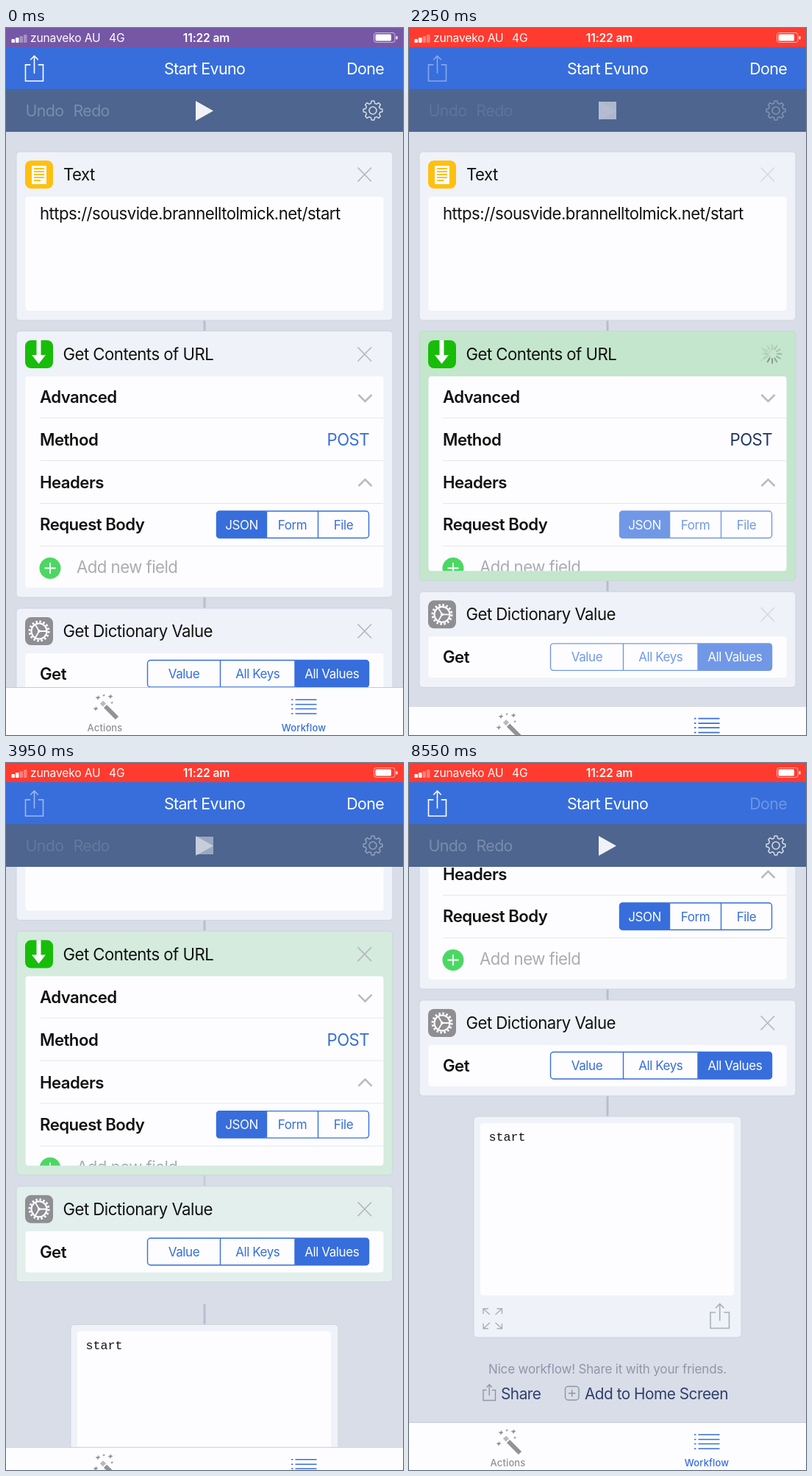
An HTML page that plays this animation: 540 px wide and 960 px high, repeating every 8600 ms.

```html
<!DOCTYPE html>
<html lang="en">
<head>
<meta charset="utf-8">
<title>Workflow run</title>
<style>
  html, body { margin: 0; width: 100%; height: 100%; overflow: hidden; background: #d8dde8; }
  svg { display: block; width: 100%; height: 100%; }
  text { font: 400 22.2px Inter, "Open Sans", sans-serif; letter-spacing: -.024em; fill: #111; white-space: pre; }
  .bold { font-weight: 600; }
  .light { font-size: 21.4px; letter-spacing: -.03em; fill: #fff; }
  .status { font-size: 15.6px; letter-spacing: -.01em; fill: #fff; }
  .segment { font-size: 17px; letter-spacing: -.025em; }
  .tab { font-size: 13px; font-weight: 500; letter-spacing: .01em; }
  .hint { font-size: 17px; letter-spacing: -.01em; fill: #8e96a8; }
  .link { font-size: 20.8px; fill: #2f3f6b; }
  .mono { font: 16.7px "Liberation Mono", monospace; letter-spacing: 0; }
  .mid { text-anchor: middle; }
  .end { text-anchor: end; }
  .line { fill: none; stroke-width: 1.6; }
</style>
</head>
<body>
<svg id="stage" viewBox="0 0 540 960" preserveAspectRatio="none"></svg>
<script>
const LOOP = 8600, STEP = 50, ROW = 57.5, SCROLL = 466;
const BLUE = '#376edc', GRAY = '#b5b8be', WHITE = '#fdfdff';

// Drawing helpers
const text = (x, y, s, cls = '', attrs = '') => `<text x="${x}" y="${y}" class="${cls}" ${attrs}>${s}</text>`;
const rect = (x, y, w, h, fill, r = 0, attrs = '') =>
  `<rect x="${x}" y="${y}" width="${w}" height="${h}" rx="${r}" fill="${fill}" ${attrs}/>`;
const line = (d, stroke, width = 1.6, attrs = '') =>
  `<path class="line" d="${d}" stroke="${stroke}" style="stroke-width:${width}" ${attrs}/>`;
const group = (id, body, attrs = '') => `<g id="${id}" ${attrs}>${body}</g>`;

const connector = (y1, y2, attrs = '') => rect(268.5, y1, 3, y2 - y1, '#b5bfcc', 0, attrs);
const separator = y => rect(46, y, 467, 1, '#e4e6eb');
const cross = y => line(`M478.500 ${y - 9.5}l18.500 19m0 -19l-18.500 19`, GRAY, 1.7, 'data-edit="1"');
const chevron = (y, up) => line(`M479.500 ${y}l9 ${up ? -9 : 9}l9 ${up ? 9 : -9}`, '#b9bbc1', 2.6);
const shareIcon = (x, y, w, h, stroke, width) => {
  const c = x + w / 2, a = w * .22, top = y + h * .35;
  return line(`M${c - a} ${top}H${x}V${y + h}H${x + w}V${top}H${c + a}M${c} ${y + h * .7}V${y}` +
    `M${c - a} ${y + a}L${c} ${y}L${c + a} ${y + a}`, stroke, width);
};

function card(id, y, h, inner, innerH) {
  const shape = (fill, name, attrs = '') => rect(14, y, 512, h, fill, 5, `id="${name}" ${attrs}`);
  return shape('#eff2f9', id + 'Base', 'stroke="#cfd5e0" stroke-width="1"') +
    shape('#a8dfb0', id + 'Glow', 'opacity="0"') +
    rect(26.5, inner, 487, innerH, WHITE, 4, `id="${id}Inner"`);
}

function segments(y, edges, labels, selected) {
  const last = edges.length - 1, h = 36.5;
  const fill = rect(edges[selected], y, edges[selected + 1] - edges[selected], h, BLUE, 3);
  const dividers = edges.slice(1, last).map(x => line(`M${x} ${y}v${h}`, BLUE, 1.4)).join('');
  const names = labels.map((s, i) => text((edges[i] + edges[i + 1]) / 2, y + 24.5, s, 'segment mid',
    `style="fill:${i === selected ? WHITE : BLUE}"`)).join('');
  return `<g data-control="1">${fill}${rect(edges[0], y, edges[last] - edges[0], h, 'none', 4,
    `stroke="${BLUE}" stroke-width="1.4"`)}${dividers}${names}</g>`;
}

function gearPath(cx, cy, teeth, inner, outer) {
  const points = [];
  for (let i = 0; i < teeth; i++)
    for (const [r, off] of [[inner, -.33], [outer, -.18], [outer, .18], [inner, .33]]) {
      const a = (i + off) / teeth * 2 * Math.PI;
      points.push(`${(cx + r * Math.sin(a)).toFixed(1)} ${(cy - r * Math.cos(a)).toFixed(1)}`);
    }
  return `M${points.join('L')}Z`;
}

const textCard = card('text', 168, 229, 229, 155) +
  rect(26, 180, 38, 38, '#fec010', 8) + rect(35, 187, 20, 25, WHITE) +
  line([191, 195, 199, 203, 207].map((y, i) => `M38 ${y}h${i === 4 ? 9 : 14}`).join(''), '#fec010', 1.8) +
  text(78, 207, 'Text') + cross(199) +
  text(46, 260, 'https://sousvide.brannelltolmick.net/start');

const urlCard = card('url', 411.5, 361.5, 473, 287) +
  rect(26, 424, 38, 38, '#17bd08', 8) +
  `<path d="M41.500 424h6v20h6.500l-9.500 12l-9.500 -12h6.500z" fill="${WHITE}"/>` +
  text(77.5, 451, 'Get Contents of URL') + cross(443) + group('spinner',
    Array.from({ length: 12 }, (_, i) =>
      `<path d="M494 435.500v-5.500" stroke="#444a48" stroke-width="2" stroke-linecap="round" transform="rotate(${i * 30} 494 442.500)"/>`).join('')) +
  group('rows', text(46, 509, 'Advanced', 'bold') + chevron(498, false) + separator(529) +
    text(46, 567, 'Method', 'bold') + text(494, 567, 'POST', 'end', 'id="post"') + separator(587) +
    text(46, 625, 'Headers', 'bold') + chevron(622, true) + separator(645) +
    text(46, 682, 'Request Body', 'bold') +
    segments(656, [286.5, 354.5, 424.5, 493.5], ['JSON', 'Form', 'File'], 0) + separator(703) +
    `<circle cx="60" cy="733.500" r="14.500" fill="#4cd763"/>` + line('M52.500 733.500h15m-7.500 -7.500v15', WHITE, 1.8) +
    text(96, 740, 'Add new field', '', 'style="fill:#aaacb2"'), 'clip-path="url(#rowsClip)"');

const dictCard = connector(773, 788, 'id="dictLink"') + card('dict', 788, 130, 849, 56) +
  rect(26, 800, 38, 38, '#8e8e93', 8) +
  `<g fill="none" stroke="${WHITE}"><circle cx="45" cy="819" r="10.500" stroke-width="2.200"/>
   <circle cx="45" cy="819" r="13" stroke-width="3" stroke-dasharray="2.550 2.555"/>
   <path d="M45 819H55M45 819L40 810.300M45 819L40 827.700" stroke-width="1.800"/></g>
   <circle cx="45" cy="819" r="2" fill="${WHITE}"/>` +
  text(77.5, 827, 'Get Dictionary Value') + cross(819) + text(46, 885, 'Get', 'bold') +
  segments(858.5, [192.5, 291.5, 393, 493.5], ['Value', 'All Keys', 'All Values'], 2);

const result = connector(918, 946) +
  rect(88, 946, 364, 300, '#eff2f9', 5, 'stroke="#cfd5e0"') + rect(97, 955, 345, 234, WHITE, 4) +
  text(108.5, 979, 'start', 'mono') +
  line('M101 1214v-7h7m-7 0l9 8M119.500 1207h7v7m0 -7l-9 8M101 1227v7h7m-7 0l9 -8M119.500 1234h7v-7m0 7l-9 -8', '#a9afba', 1.4) +
  shareIcon(410, 1200.5, 25.5, 33, '#a9afba', 1.6) +
  text(270, 1295, 'Nice workflow! Share it with your friends.', 'hint mid') +
  shareIcon(101, 1310, 16.5, 21.5, '#8e96a8', 1.4) + text(125, 1330, 'Share', 'link') +
  rect(212.5, 1312.5, 18.5, 18.5, 'none', 4, 'stroke="#8e96a8" stroke-width="1.400"') +
  line('M217 1321.750h9.500m-4.750 -4.750v9.500', '#8e96a8', 1.4) + text(239, 1330, 'Add to Home Screen', 'link');

const star = (x, y, r) => `M${x - r} ${y}L${x} ${y - r / 3}L${x} ${y - r}L${x + r / 3} ${y - r / 3}L${x + r} ${y}L${x + r / 3} ${y + r / 3}L${x} ${y + r}L${x - r / 3} ${y + r / 3}Z`;
const tabBar = rect(0, 895, 540, 65, WHITE) + rect(0, 895, 540, 1, '#c6cad2') +
  line('M135 921L151 937', '#929297', 6) + line('M130 915.500L134 919.500', '#b9b9be', 6) +
  `<path fill="#929297" d="${star(125, 909, 3.5)}${star(142, 907.5, 3.5)}${star(122, 924, 3.5)}${star(133, 906, 2)}${star(144, 916, 2)}"/>` +
  text(134.5, 955, 'Actions', 'tab mid', 'style="fill:#929297"') +
  [912, 918.5, 924.5, 931].map(y => line(`M388 ${y}h2.500m3 0h29`, BLUE, 1.7)).join('') +
  text(405, 955, 'Workflow', 'tab mid', `style="fill:${BLUE}"`);

const header = rect(0, 0, 540, 26, '#ff3b30', 0, 'id="statusBar"') +
  [5, 7, 9, 11].map((h, i) => rect(7.5 + i * 5.5, 20 - h, 4.5, h, '#fff', 1, `opacity="${i < 2 ? 1 : .35}"`)).join('') +
  text(33, 19, 'zunaveko AU', 'status') + text(140, 19, '4G', 'status') + text(272.5, 19, '11:22 am', 'status mid bold') +
  rect(500.5, 6.5, 28.5, 13, 'none', 3, 'stroke="#fff" stroke-opacity=".600"') + rect(502.5, 8.5, 21.5, 9, '#fff', 1.5) +
  rect(530.5, 11, 2, 4.5, '#fff', 1) +
  rect(0, 26, 540, 57, BLUE) + text(270, 63, 'Start Evuno', 'light mid') + text(514, 63, 'Done', 'light end', 'id="done"') +
  rect(0, 83, 540, 58, '#4d658f') +
  group('tools', shareIcon(26.5, 38, 24, 34, '#fff', 1.6) +
    `<g opacity=".250">${text(26.5, 120, 'Undo', 'light')}${text(91.5, 120, 'Redo', 'light')}</g>` +
    line(gearPath(499, 112, 8, 10, 13), '#d5dbe6', 1.5, 'stroke-linejoin="round"') +
    '<circle class="line" cx="499" cy="112" r="5" stroke="#d5dbe6"/>') +
  '<path id="play" d="M258 99L282 112.500L258 126Z" fill="#f0f2f7"/>' + rect(258, 100, 24, 24, '#eeeff5', 0, 'id="stop"');

const $ = id => document.getElementById(id);
const set = (id, name, value) => $(id).setAttribute(name, value);
$('stage').innerHTML =
  '<defs><clipPath id="rowsClip"><rect id="rowsBox" x="26" y="473" width="488" height="287"/></clipPath></defs>' +
  rect(0, 0, 540, 960, '#d8dde8') +
  group('content', connector(397, 411) + textCard + group('result', result) + group('dict', dictCard) + urlCard) +
  group('tabBar', tabBar) + header;

// Motion
const ramp = (t, from, to) => Math.min(1, Math.max(0, (t - from) / (to - from)));
const ease = (t, from, to) => { const p = ramp(t, from, to); return p * p * (3 - 2 * p); };
const mix = (a, b, p) => `rgb(${a.map((v, i) => Math.round(v + (b[i] - v) * p))})`;
const each = (selector, fn) => document.querySelectorAll(selector).forEach(fn);

function draw(time) {
  const t = Math.floor(time % LOOP / STEP) * STEP;
  const leave = ramp(t, 2100, 2350);
  const open = 1 - ease(t, 2100, 2450) + ease(t, 3760, 4150);
  const controls = 1 - leave + ramp(t, 3700, 3800);
  const back = ramp(t, 3790, 4100);
  const lost = ROW * (1 - open);

  set('statusBar', 'fill', mix([118, 87, 166], [255, 59, 48], ramp(t, 0, 300)));
  set('done', 'opacity', t >= 8550 ? .27 : t >= 8500 ? .4 : 1);
  set('tools', 'opacity', 1 - leave + back);
  set('play', 'opacity', t < 1950 ? 1 : t < 2100 ? .25 : .25 * (1 - leave) + back);
  set('stop', 'opacity', leave - back);

  set('content', 'transform', `translate(0 ${-SCROLL * ease(t, 3800, 4150)})`);
  set('dict', 'transform', `translate(0 ${-lost})`);
  set('dictLink', 'opacity', 1 - ramp(t, 3700, 3800) + ramp(t, 3800, 4100));
  set('tabBar', 'transform', `translate(0 ${65 * (1 - open)})`);
  for (const id of ['urlBase', 'urlGlow']) set(id, 'height', 361.5 - lost);
  for (const id of ['urlInner', 'rowsBox']) set(id, 'height', 287 - lost);
  set('urlGlow', 'opacity', leave * (1 - ramp(t, 3700, 4100)));
  set('dictGlow', 'opacity', .37 * ramp(t, 3700, 3800) * (1 - ramp(t, 3800, 4100)));
  set('result', 'opacity', ramp(t, 3700, 3800));

  each('[data-edit]', el => el.setAttribute('opacity', controls));
  each('[data-control]', el => el.setAttribute('opacity', .5 + controls / 2));
  $('post').style.fill = mix([17, 17, 17], [55, 110, 220], controls);

  set('spinner', 'opacity', 1 - controls);
  const head = (Math.floor(t / 83.3) + 4) % 12;
  each('#spinner path', (el, i) => el.setAttribute('opacity', Math.max(.2, .85 - (head - i + 12) % 12 * .09)));
}

const start = performance.now();
(function tick() {
  draw(performance.now() - start);
  requestAnimationFrame(tick);
})();
</script>
</body>
</html>
```
